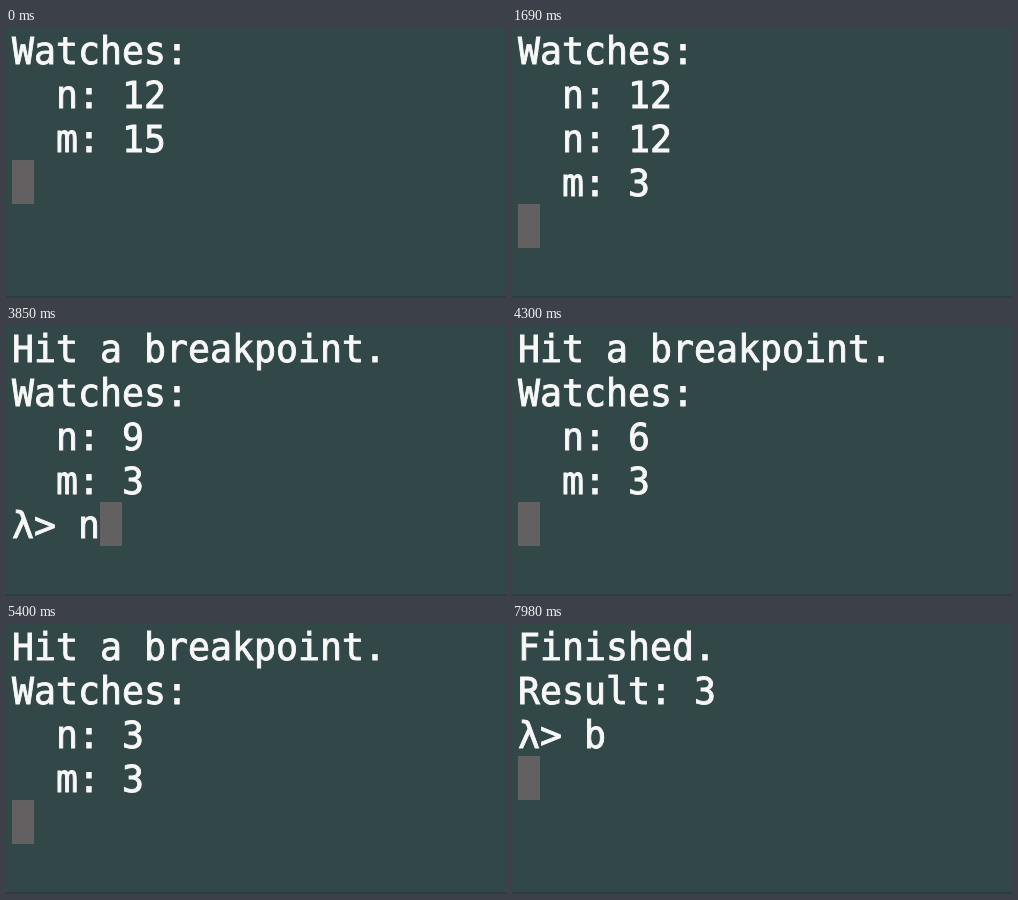
An HTML page for the animation above (8000 ms loop, 500 by 270 pixels).

```html
<!DOCTYPE html>
<html lang="en">
<head>
<meta charset="utf-8">
<title>Debugger session</title>
<style>
  html, body { margin: 0; width: 100%; height: 100%; overflow: hidden; background: #324747; }
  svg { display: block; width: 500px; height: 270px; }
  text {
    font: 36.54px "DejaVu Sans Mono", monospace;
    white-space: pre;
    fill: #f8f8f8;
    stroke: #f8f8f8;
    stroke-width: .9px;
  }
</style>
</head>
<body>
<svg viewBox="0 0 500 270">
  <rect width="500" height="270" fill="#324747"/>
  <rect y="268" width="500" height="2" fill="#2c3d3e"/>
  <rect id="cursor" width="22" height="44" fill="#626060"/>
  <g id="lines"></g>
</svg>
<script>
const LOOP = 8000, CELL_W = 22, CELL_H = 44, LEFT = 6, BASELINE = 36, ROWS = 6;

const watches = (n, m) => `Watches:\n  n: ${n}\n  m: ${m}\n`;
const hit = n => "Hit a breakpoint.\n" + watches(n, 3);
const start = watches(12, 15);
const repeated = "Watches:\n  n: 12\n  n: 12\n  m: 3\n";
const finished = "Finished.\nResult: 3\n";
const next = "λ> n";

// [start time, terminal contents]; the cursor follows the last character
const timeline = [
  [0, start],
  [1160, start + next],
  [1490, start + next + "\n"],
  [1590, ""],
  [1690, repeated],
  [2430, repeated + next],
  [2830, repeated + next + "\n"],
  [2930, ""],
  [3030, "Hit a breakpoint.\nWatches:\n"],
  [3850, hit(9) + next],
  [4100, hit(9) + next + "\n"],
  [4200, ""],
  [4300, hit(6)],
  [4400, hit(6) + "λ> "],
  [4980, hit(6) + next],
  [5200, hit(6) + next + "\n"],
  [5300, ""],
  [5400, hit(3)],
  [5780, hit(3) + next],
  [6080, hit(3) + next + "\n"],
  [6180, ""],
  [6280, finished],
  [7730, finished + "λ> b"],
  [7980, finished + "λ> b\n"]
];

const cursor = document.getElementById("cursor");
const rows = Array.from({ length: ROWS }, (_, row) => {
  const text = document.createElementNS("http://www.w3.org/2000/svg", "text");
  text.setAttribute("x", LEFT);
  text.setAttribute("y", BASELINE + row * CELL_H);
  return document.getElementById("lines").appendChild(text);
});

function show(screen) {
  const lines = screen.split("\n");
  rows.forEach((text, row) => { text.textContent = lines[row] || ""; });
  cursor.setAttribute("x", LEFT + lines.at(-1).length * CELL_W);
  cursor.setAttribute("y", (lines.length - 1) * CELL_H);
}

const origin = performance.now();
let current = null;

function tick() {
  const time = (performance.now() - origin) % LOOP;
  const entry = timeline.findLast(([at]) => at <= time);
  if (entry !== current) show((current = entry)[1]);
  requestAnimationFrame(tick);
}
tick();
</script>
</body>
</html>
```
